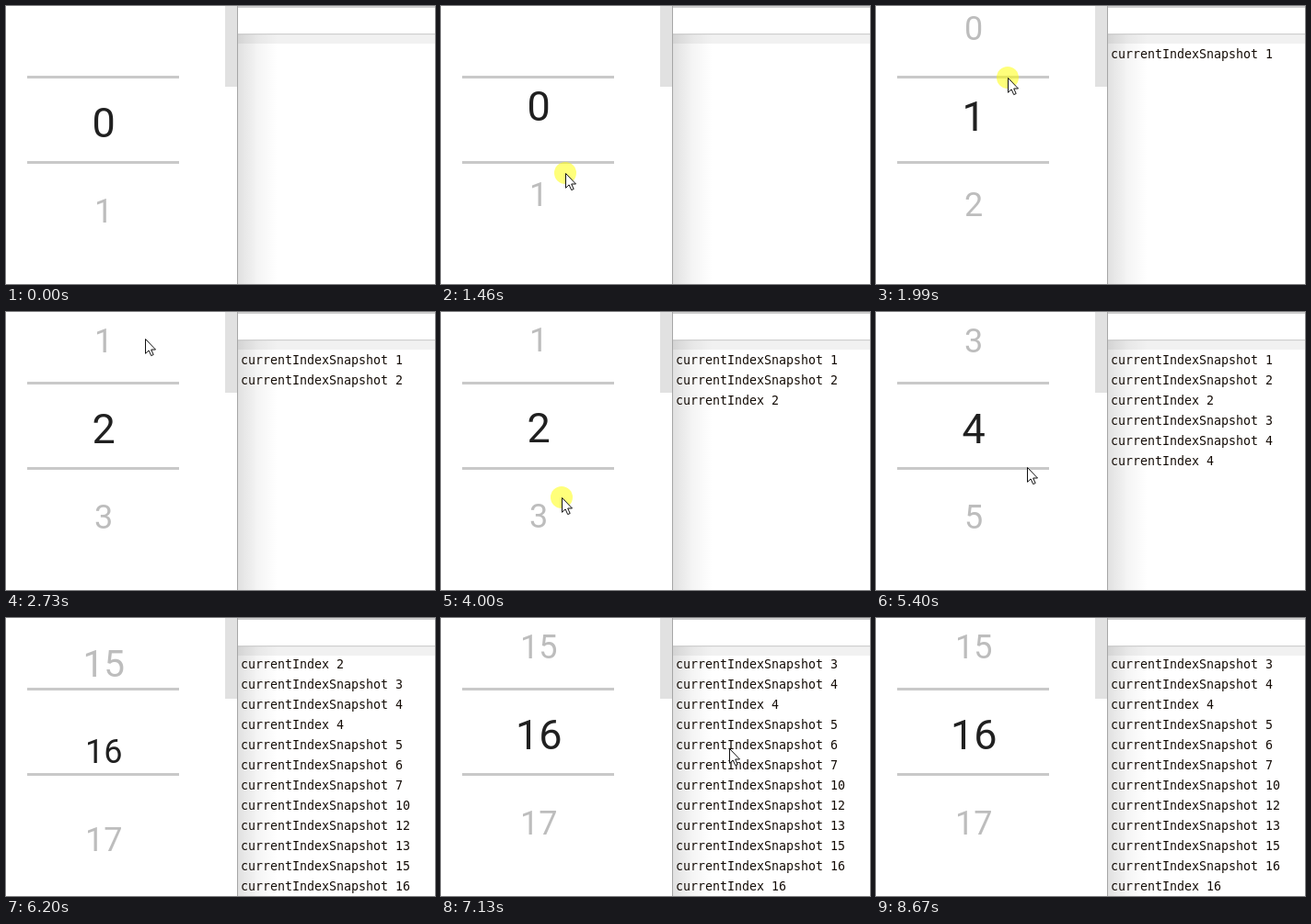
Recreate the animation shown at these times as an HTML page. Size 466 px wide and 303 px high, loop 8730 ms.

```html
<!DOCTYPE html>
<html lang="en">
<head>
<meta charset="utf-8">
<title>Number picker with log</title>
<style>
  html, body { margin: 0; width: 100%; height: 100%; overflow: hidden; background: #fff; }
  svg { display: block; width: 466px; height: 303px; }
  #wheel text { font-family: Roboto, sans-serif; text-anchor: middle; }
  #log text { font: 13.29px "DejaVu Sans Mono", monospace; fill: #140c06; white-space: pre; }
  .rule { fill: #c9c9c9; }
  .edge { fill: #cecece; }
</style>
</head>
<body>
<svg viewBox="0 0 466 303">
  <defs>
    <clipPath id="wheelClip"><rect y="-20" width="238" height="288"/></clipPath>
    <clipPath id="logClip"><rect x="252" y="41" width="214" height="262"/></clipPath>
    <linearGradient id="shade">
      <stop offset="0" stop-opacity=".12"/>
      <stop offset=".5" stop-opacity=".04"/>
      <stop offset="1" stop-opacity="0"/>
    </linearGradient>
  </defs>
  <rect width="466" height="303" fill="#fff"/>

  <g id="wheel" clip-path="url(#wheelClip)"></g>
  <rect class="rule" x="23" y="76" width="165" height="3"/>
  <rect class="rule" x="23" y="169" width="165" height="3"/>
  <rect x="238" width="13" height="88" fill="#e1e1e1"/>

  <rect class="edge" x="252" y="0" width="214" height="2"/>
  <rect class="edge" x="252" y="30" width="214" height="1.5"/>
  <rect x="252" y="31.5" width="214" height="9.5" fill="#f1f1f1"/>
  <rect x="252" y="31" width="43" height="272" fill="url(#shade)"/>
  <rect x="251" width="1" height="303" fill="#a6a6a6"/>
  <g clip-path="url(#logClip)"><g id="log"></g></g>

  <g id="cursor">
    <circle id="press" r="12" fill="#ff0" fill-opacity=".52"/>
    <path d="M.5 .5V16.3L4.1 12.9 6.7 18.6 9.2 17.5 6.7 12H11.5Z" fill="#fff" stroke="#111"/>
  </g>
</svg>
<script>
const LOOP = 8730, STEP = 1000 / 15;
const PITCH = 96, MID_X = 106.2, MID_Y = 127;
const SMALL = 36, BIG = 45, GROW = 133;
const SETTLE = 330, HOLD = 90;

const $ = id => document.getElementById(id);
const clamp = v => Math.max(0, Math.min(1, v));
const smooth = p => p * p * (3 - 2 * p);
const progress = (m, t) => smooth(clamp((t - m.start) / m.time));

// Three drags of the wheel; the last one coasts and then snaps
const spins = [
  { start: 1200, time: 1400, to: 2 },
  { start: 3990, time: 300, to: 4 },
  { start: 5662, time: 572, to: 15.93 },
  { start: 6234, time: 100, to: 16 }
];

// Each stroke curves past a bend to its end
const home = [450, 305];
const stroke = (start, time, bend, to, drag = false) => ({ start, time, bend, to, drag });
const strokes = [
  stroke(40, 890, [280, 280], [134, 215]),
  stroke(1150, 1183, [134, 122], [151, 29], true),
  stroke(2740, 860, [120, 140], [131, 231]),
  stroke(3930, 340, [131, 100], [165, -40], true),
  stroke(4450, 940, [210, 60], [164, 169]),
  stroke(5400, 190, [145, 200], [133, 232]),
  stroke(5640, 310, [133, 80], [150, -40], true),
  stroke(6350, 1400, [150, 190], [620, 165]),
  stroke(7800, 280, [550, 180], [480, 200]),
  stroke(8090, 330, [415, 260], home)
];

const wheelAt = t => spins.reduce((pos, s) => pos + (s.to - pos) * progress(s, t), 0);

function cursorAt(t) {
  let from = home;
  for (const s of strokes) {
    if (t < s.start) break;
    const p = progress(s, t), q = 1 - p;
    from = from.map((v, i) => q * q * v + 2 * p * q * s.bend[i] + p * p * s.to[i]);
  }
  return from;
}

function addText(parent, content) {
  const el = document.createElementNS("http://www.w3.org/2000/svg", "text");
  el.textContent = content;
  return parent.appendChild(el);
}

// The nearest item is noted at every step, so a fast spin skips some
const picks = [{ at: -2000, index: -1 }, { at: -1000, index: 0 }];
for (let t = 0; t < LOOP; t += STEP) {
  const index = Math.round(wheelAt(t));
  if (index !== picks.at(-1).index) picks.push({ at: t, index });
}

const entries = [
  ...picks.slice(2).map(p => ({ at: p.at, text: "currentIndexSnapshot " + p.index })),
  ...spins.filter(s => Number.isInteger(s.to))
    .map(s => ({ at: s.start + s.time + SETTLE, text: "currentIndex " + s.to }))
].sort((a, b) => a.at - b.at);

const items = Array.from({ length: 19 }, (_, i) => addText($("wheel"), i));
entries.forEach((entry, i) => {
  entry.el = addText($("log"), entry.text);
  entry.el.setAttribute("x", 255);
  entry.el.setAttribute("y", 57 + i * 22);
});

function drawWheel(t) {
  const pos = wheelAt(t);
  const [prev, now] = picks.filter(p => p.at <= t + 1).slice(-2);
  const grown = clamp((t - now.at) / GROW);
  const left = clamp(clamp((now.at - prev.at) / GROW) - grown);

  items.forEach((el, i) => {
    const y = MID_Y + (i - pos) * PITCH;
    const scale = i === now.index ? grown : i === prev.index ? left : 0;
    const size = SMALL + (BIG - SMALL) * scale;
    el.setAttribute("x", MID_X);
    el.setAttribute("y", y + size * .3555);
    el.setAttribute("font-size", size);
    el.setAttribute("fill", i === now.index ? "#202020" : "#bdbdbd");
  });
}

function drawLog(t) {
  let count = 0;
  for (const { at, el } of entries) {
    const shown = at <= t + 1;
    el.style.display = shown ? "" : "none";
    count += shown;
  }
  const scroll = Math.max(0, count * 22 - 262);
  $("log").setAttribute("transform", `translate(0 ${-scroll})`);
}

function drawCursor(t) {
  const [x, y] = cursorAt(t).map(Math.round);
  $("cursor").setAttribute("transform", `translate(${x} ${y})`);
  const down = strokes.some(s => s.drag && t >= s.start - HOLD && t < s.start + s.time);
  $("press").style.display = down ? "" : "none";
}

// The picture advances in fixed steps
function draw(ms) {
  const t = Math.floor((ms % LOOP + 7) / STEP) * STEP;
  drawWheel(t);
  drawLog(t);
  drawCursor(t);
}

const start = performance.now();
function tick() {
  draw(performance.now() - start);
  requestAnimationFrame(tick);
}
tick();
</script>
</body>
</html>
```
